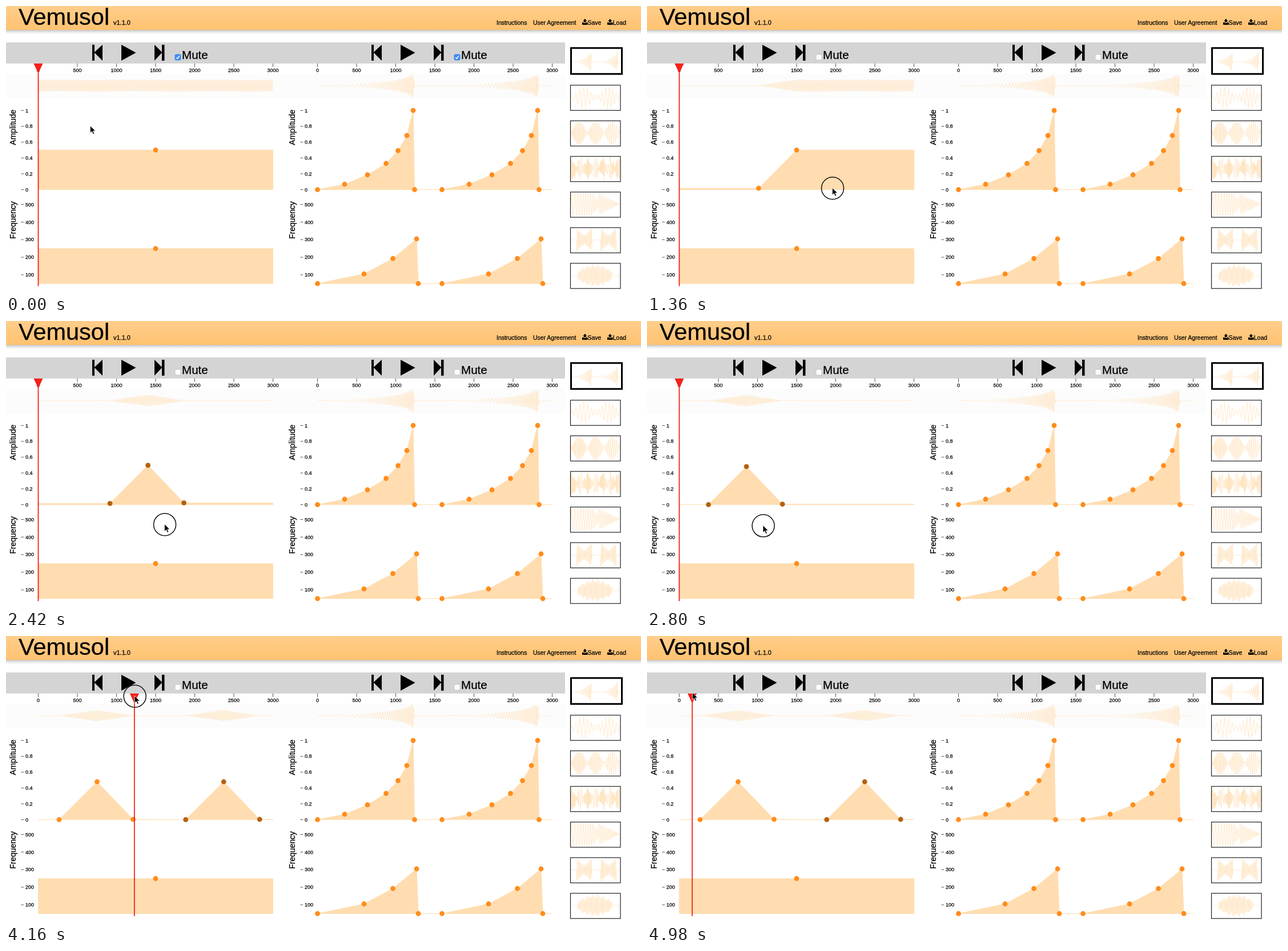
Animation, 1112 px wide and 504 px high, one loop 5000 ms. Source, as an HTML page:

```html
<!DOCTYPE html>
<html lang="en">
<head>
<meta charset="utf-8">
<title>Vemusol</title>
<style>
html, body { margin: 0; width: 100%; height: 100%; overflow: hidden; background: #fff; }
svg { display: block; width: 1112px; height: 504px; font-family: "Liberation Sans", Arial, sans-serif; }
text { stroke: #000; stroke-width: .25; }
.wave { fill: none; stroke: #ffdfb3; stroke-width: .7; }
.area { fill: #ffddb0; stroke: #ffddb0; stroke-width: .9; }
.tick { stroke: #555; stroke-width: 1; }
</style>
</head>
<body>
<svg id="stage" viewBox="0 0 1112 504" xmlns="http://www.w3.org/2000/svg"></svg>
<script>
const LOOP = 5000, LEFT = 56.5, WIDTH = 411, SHIFT = 489, RIGHT = LEFT + SHIFT;
const AMP0 = 322.5, AMP_H = 139, FREQ0 = 487.5, WAVE_Y = 139.8;
const ORANGE = '#ff8c1c', DARK = '#b5610f';

const clamp = (v, a, b) => Math.max(a, Math.min(b, v));
const text = (x, y, size, s, more = '') => `<text x="${x}" y="${y}" font-size="${size}" ${more}>${s}</text>`;
const rect = (x, y, w, h, fill, more = '') => `<rect x="${x}" y="${y}" width="${w}" height="${h}" fill="${fill}" ${more}/>`;
const path = (d, more = '') => `<path d="${d}" ${more}/>`;

// Piecewise linear lookup, flat beyond both ends
function lerp(pts, x) {
  const i = pts.findIndex(p => p[0] >= x);
  if (i < 0) return pts[pts.length - 1][1];
  if (i === 0) return pts[0][1];
  const [ax, ay] = pts[i - 1], [bx, by] = pts[i];
  return ay + (by - ay) * (x - ax) / (bx - ax);
}

// amp(u) is the height in px, freq(u) is cycles per px
function wavePath(x0, width, cy, amp, freq, step = .4) {
  let d = '', phase = 0;
  for (let x = 0; x <= width; x += step) {
    const y = cy - amp(x / width) * Math.sin(phase * 2 * Math.PI);
    d += (x ? 'L' : 'M') + (x0 + x).toFixed(1) + ' ' + y.toFixed(1);
    phase += freq(x / width) * step;
  }
  return d;
}

function panelWave(x0, amps, freqs) {
  const px = u => x0 + u * WIDTH;
  return wavePath(x0, WIDTH, WAVE_Y,
    u => (AMP0 - lerp(amps, px(u))) / AMP_H * 21,
    u => (50 + (FREQ0 - lerp(freqs, px(u))) * 3.24) / 700);
}

function areaPath(x0, pts, base) {
  const x1 = x0 + WIDTH;
  const line = pts.map(p => `L${p[0]} ${p[1]}`).join('');
  return `M${x0} ${base}L${x0} ${pts[0][1]}${line}L${x1} ${pts[pts.length - 1][1]}L${x1} ${base}Z`;
}

const dots = (pts, fill = () => ORANGE) =>
  pts.map((p, i) => `<circle cx="${p[0]}" cy="${p[1]}" r="4.4" fill="${fill(i)}"/>`).join('');
const area = (x0, pts, base) => path(areaPath(x0, pts, base), 'class="area"') + dots(pts);

// Repeats a shape dx further right
const twice = (pts, dx) => pts.concat(pts.map(([x, y]) => [x + dx, y]));
// Offsets and heights above the base line of the right panel
const ramp = (base, pts) => twice(pts.map(([x, h]) => [RIGHT + x, base - h]), 218);

const rampAmp = ramp(AMP0, [[0, 0], [47.5, 9.5], [87.5, 26], [120, 46], [141, 68.5], [156.5, 95], [167.5, AMP_H], [170, 0]]);
const rampFreq = ramp(FREQ0, [[0, 0], [81.5, 17], [132, 44], [173.5, 78.5], [176.5, 0]]);
const flatFreq = [[262, 426]];

function header() {
  const link = (x, y, s) => text(x, y, 10.45, s);
  const icon = (x, arrow) => path(`M${x} 28.7h2.5l1 1.3h2.6l1-1.3h2.5v4.3h-9.6z` + arrow);
  return rect(0, 42, 1112, 8, 'url(#shade)') + rect(0, 0, 1112, 42, 'url(#bar)') +
    text(22, 33, 41.5, 'Vemusol') + text(188, 33, 11, 'v1.1.0') +
    link(859, 32.5, 'Instructions') + link(923, 32.5, 'User Agreement') +
    icon(1009, 'M1012.4 23h2.8v2.6h2.2l-3.6 3.6-3.6-3.6h2.2z') + link(1018.5, 32.5, 'Save') +
    icon(1053, 'M1056.4 29v-2.6h-2.2l3.6-3.6 3.6 3.6h-2.2v2.6z') + link(1062.8, 32.5, 'Load');
}

function panel(dx) {
  const buttons = path('M151 68h4v13l14-13v28l-14-14v14h-4z') + path('M202 68l25.5 14-25.5 14z') +
    path('M260 68l13 13v-13h4.5v28h-4.5v-14l-13 14z') + text(308, 93, 20.6, 'Mute');
  const label = (y, v) => path(`M26.5 ${y}h4.5`, 'class="tick"') + text(34, y + 3.1, 9, v);
  const side = (y, s) => text(0, 0, 14, s, `transform="translate(17 ${y}) rotate(-90)" text-anchor="middle"`);
  let axes = side(213, 'Amplitude') + side(376, 'Frequency');
  for (let i = 0; i <= 6; i++) {
    const x = LEFT + i * WIDTH / 6;
    axes += path(`M${x} 101v6`, 'class="tick"') + text(x, 116, 9, i * 500, 'text-anchor="middle"');
  }
  for (let i = 0; i <= 5; i++) axes += label(AMP0 - i * 27.8, i / 5);
  for (let i = 1; i <= 5; i++) axes += label(503 - i * 30.9, i * 100);
  return `<g transform="translate(${dx})">${buttons}${axes}</g>`;
}

function thumbs() {
  const { sin, abs, PI } = Math;
  const px = u => RIGHT + u * WIDTH;
  const bow = v => v < 0 || v > 1 ? 0 : .35 + .65 * abs(2 * v - 1);
  const looks = [
    [u => (AMP0 - lerp(rampAmp, px(u))) / AMP_H, u => .16 + (FREQ0 - lerp(rampFreq, px(u))) / 260],
    [u => .2 + .7 * sin(PI * (u * 2 - .02)) ** 2, u => .14 + .03 * u],
    [u => abs(sin(PI * u * 3)), u => .47 - .23 * u],
    [u => .62 + .3 * sin(u * 41) + .15 * sin(u * 97), u => .55 + .3 * sin(u * 23)],
    [u => u < .56 ? clamp(1 - (u - .42) * 5, .2, .95) : (1 - u) * 2.1, u => .17 + .2 * u],
    [u => bow((u - .115) / .31) + bow((u - .605) / .31), () => .45],
    [u => u < .14 || u > .83 ? 0 : (.4 + .6 * sin(PI * (u - .14) / .69)) * (.85 + .15 * sin(u * 60)), () => .45]
  ];
  return looks.map(([amp, freq], i) => {
    const top = 76.5 + i * 62.55;
    const d = wavePath(989, 87, top + 21.5, u => amp(u) * 20.5, freq);
    const frame = i ? rect(988.5, top, 87.5, 44.3, 'none', 'stroke="#222" stroke-width="1.2"')
      : rect(989.5, 73.8, 89, 45.5, 'none', 'stroke="#000" stroke-width="3"');
    return path(d, 'class="wave"') + frame;
  }).join('');
}

const stage = document.getElementById('stage');
stage.innerHTML = `<defs>
<linearGradient id="bar" x2="0" y2="1"><stop stop-color="#ffce8b"/><stop offset="1" stop-color="#ffc270"/></linearGradient>
<linearGradient id="shade" x2="0" y2="1"><stop stop-color="#c4c4c4"/><stop offset=".5" stop-color="#ebebeb"/><stop offset="1" stop-color="#fff"/></linearGradient></defs>` +
  header() + rect(0, 64, 979, 37, '#d4d4d4') + rect(0, 119, 979, 43, '#fcfcfc') +
  panel(0) + panel(SHIFT) + thumbs() +
  path(panelWave(RIGHT, rampAmp, rampFreq), 'class="wave"') +
  area(RIGHT, rampAmp, AMP0) + area(RIGHT, rampFreq, FREQ0) + area(LEFT, flatFreq, FREQ0) +
  `<path id="wave" class="wave"/><g id="amps"/><g id="boxes"/>
<g id="head" fill="#f5211a"><path d="M-8 101h16l-8 17.5z"/><path d="M-.9 117h1.8v375h-1.8z"/></g>
<g id="pointer"><circle id="ring" r="19.5" fill="none" stroke="#111" stroke-width="1.5"/>
<path d="M-.6-.8v12.8l3-2.7 2.1 4.8 2.2-1-2.1-4.6h4.1z" stroke="#fff" stroke-width=".8"/></g>`;
const el = id => document.getElementById(id);

// Pointer stops: arrive, leave, x, y, and whether the way onward is a drag
const stops = [
  [0, 0, 148, 211], [320, 460, 301, 91], [960, 1100, 195, 320], [1320, 1420, 325, 320],
  [1570, 1600, 160, 236, true], [1850, 1870, 386, 360],
  [2180, 2260, 291.5, 357, true], [2970, 3000, 189, 360],
  [3260, 3380, 315, 105], [3800, 3940, 108, 109, true],
  [4480, 4520, 430, 100, true], [4960, 4960, 80, 100]
];

function pointer(t) {
  const i = stops.findLastIndex(s => s[0] <= t);
  const [arrive, leave, x, y, drag] = stops[i];
  const [arrive2, , x2, y2] = stops[i + 1] || [LOOP, 0, x, y];
  const k = clamp((t - leave) / (arrive2 - leave), 0, 1), e = k * k * (3 - 2 * k);
  const down = t < leave ? t > leave - 100 : !!drag;
  return { x: x + (x2 - x) * e, y: y + (y2 - y) * e, down };
}

const ADD_LEFT = 1040, ADD_RIGHT = 1375, BRUSH = 1600, BRUSHED = 1850;
const GRAB = 2260, DROP = 2970, SEEK = 3300, PASTE = 3480, SCRUB = 3860;

function points(t) {
  let pts = [[262, 253]];
  if (t >= ADD_LEFT) pts.unshift([195.5, 320]);
  if (t >= ADD_RIGHT) pts.push([325, 319]);
  if (t >= GRAB) {
    const { x, y } = pointer(Math.min(t, DROP));
    pts = pts.map(p => [p[0] + x - 291.5, Math.min(AMP0, p[1] + y - 357)]);
  }
  return t >= PASTE ? twice(pts, 221.7) : pts;
}

function checkbox(x, on) {
  return rect(x, 85, 10, 10, on ? '#3b8df8' : '#fff', `rx="2" stroke="${on ? '#2f7fe8' : '#bbb'}" stroke-width=".8"`) +
    (on ? path(`M${x + 2.3} 90.3l2 2.2 3.6-5`, 'fill="none" stroke="#fff" stroke-width="1.5"') : '');
}

function draw(t) {
  const { x, y, down } = pointer(t), amps = points(t);
  const chosen = i => t >= PASTE ? i > 2 : t >= BRUSHED || (t >= BRUSH && amps[i][0] < x);
  const headX = t < SEEK ? LEFT : t < SCRUB ? 314.5 : x - .8;
  el('wave').setAttribute('d', panelWave(LEFT, amps, flatFreq));
  el('amps').innerHTML = path(areaPath(LEFT, amps, AMP0), 'class="area"') +
    dots(amps, i => chosen(i) ? DARK : ORANGE);
  el('boxes').innerHTML = checkbox(296, t < 400) + checkbox(296 + SHIFT, t < 400);
  el('head').setAttribute('transform', `translate(${headX})`);
  el('pointer').setAttribute('transform', `translate(${x} ${y})`);
  el('ring').style.display = down ? '' : 'none';
}

function tick() {
  draw(performance.now() % LOOP);
  requestAnimationFrame(tick);
}
tick();
</script>
</body>
</html>
```
